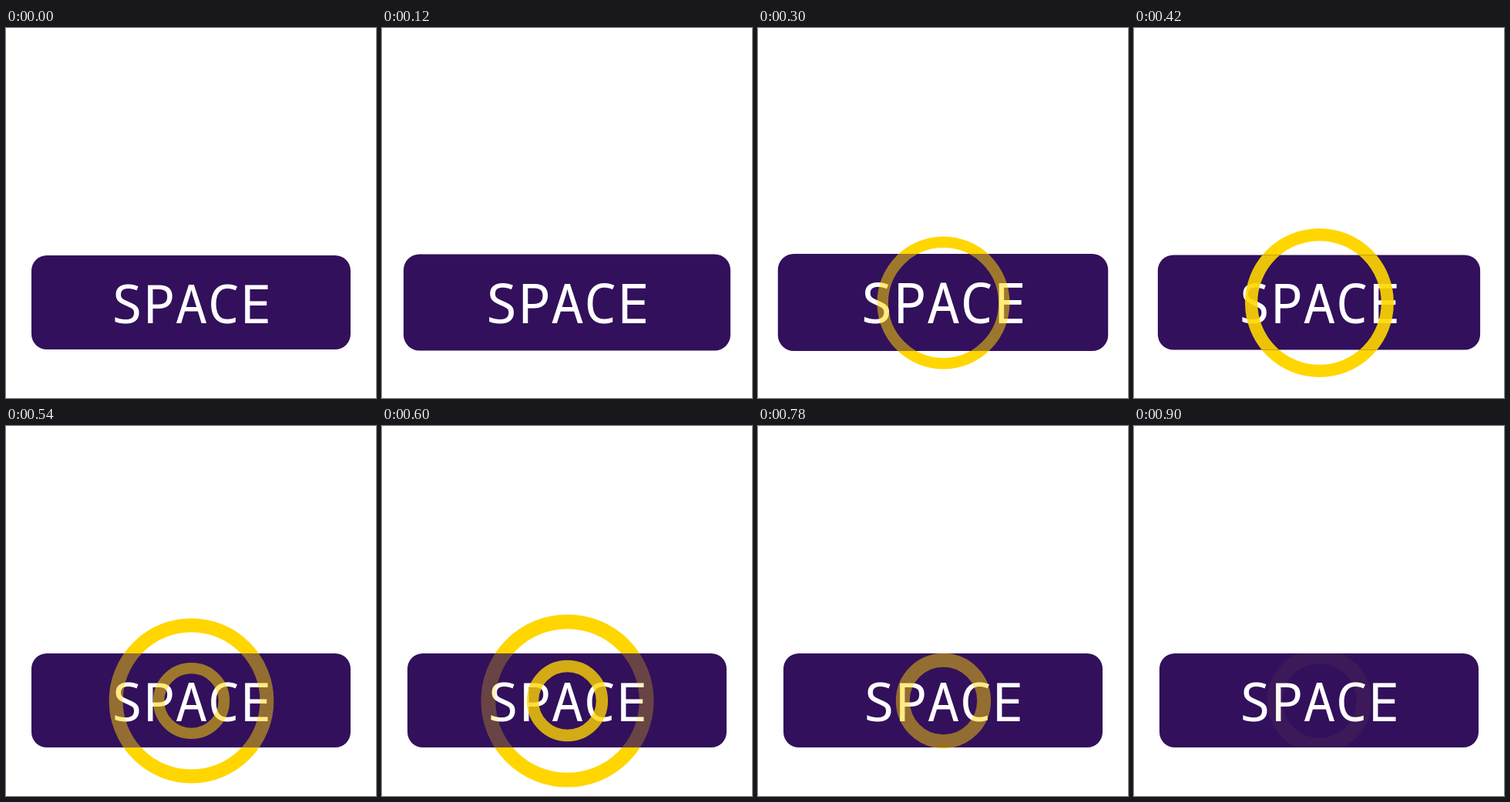
These frames come from a looping animation (480 by 480 pixels, 960 ms). An HTML page with a canvas:

```html
<!DOCTYPE html>
<html>
<head>
<meta charset="utf-8">
<style>
  html, body { margin: 0; width: 100%; height: 100%; overflow: hidden; background: #fff; }
  canvas { display: block; }
</style>
</head>
<body>
<canvas id="stage" width="480" height="480"></canvas>
<script>
const ctx = document.getElementById('stage').getContext('2d');
const LOOP = 960, STEP = 60;
const YELLOW = '#ffd600', PURPLE = '#32105c';
const rings = [{ start: 180, radius: 75.6 }, { start: 420, radius: 43.6 }];

// Fades in, peaks shortly before the middle, fades out.
function ringAlpha(age) {
  return Math.max(0, Math.min(age / 230, 0.9 - (age - 240) * 0.00355));
}

function drawRing({ start, radius }, t, alpha) {
  const scale = 1 + (t - start) * 0.00115;
  const width = 12.7 * scale;
  ctx.globalAlpha = alpha;
  ctx.strokeStyle = YELLOW;
  ctx.lineWidth = width;
  ctx.beginPath();
  ctx.arc(240.5, 356.5, radius * scale - width / 2, 0, Math.PI * 2);
  ctx.stroke();
}

function draw(t) {
  ctx.fillStyle = '#fff';
  ctx.fillRect(0, 0, 480, 480);

  // Outside the key the rings are either solid or hidden.
  for (const ring of rings) {
    if (ringAlpha(t - ring.start) > 0.2) drawRing(ring, t, 1);
  }

  const scale = 1 + 0.048 * Math.max(0, 1 - Math.abs(t - 235) / 235);
  ctx.save();
  ctx.globalAlpha = 1;
  ctx.translate(240, 356);
  ctx.scale(scale, scale);
  ctx.beginPath();
  ctx.roundRect(-207, -61, 414, 122, 20);
  ctx.fillStyle = PURPLE;
  ctx.fill();
  ctx.clip();
  ctx.fillStyle = '#fff';
  ctx.font = '70px "Noto Sans Mono", monospace';
  ctx.textAlign = 'center';
  ctx.fillText('SPACE', 0.5, 26.5);

  ctx.setTransform(1, 0, 0, 1, 0, 0);
  for (const ring of rings) drawRing(ring, Math.max(t, ring.start), ringAlpha(t - ring.start));
  ctx.restore();
}

function tick() {
  draw(Math.floor((performance.now() % LOOP) / STEP) * STEP);
  requestAnimationFrame(tick);
}
tick();
</script>
</body>
</html>
```
